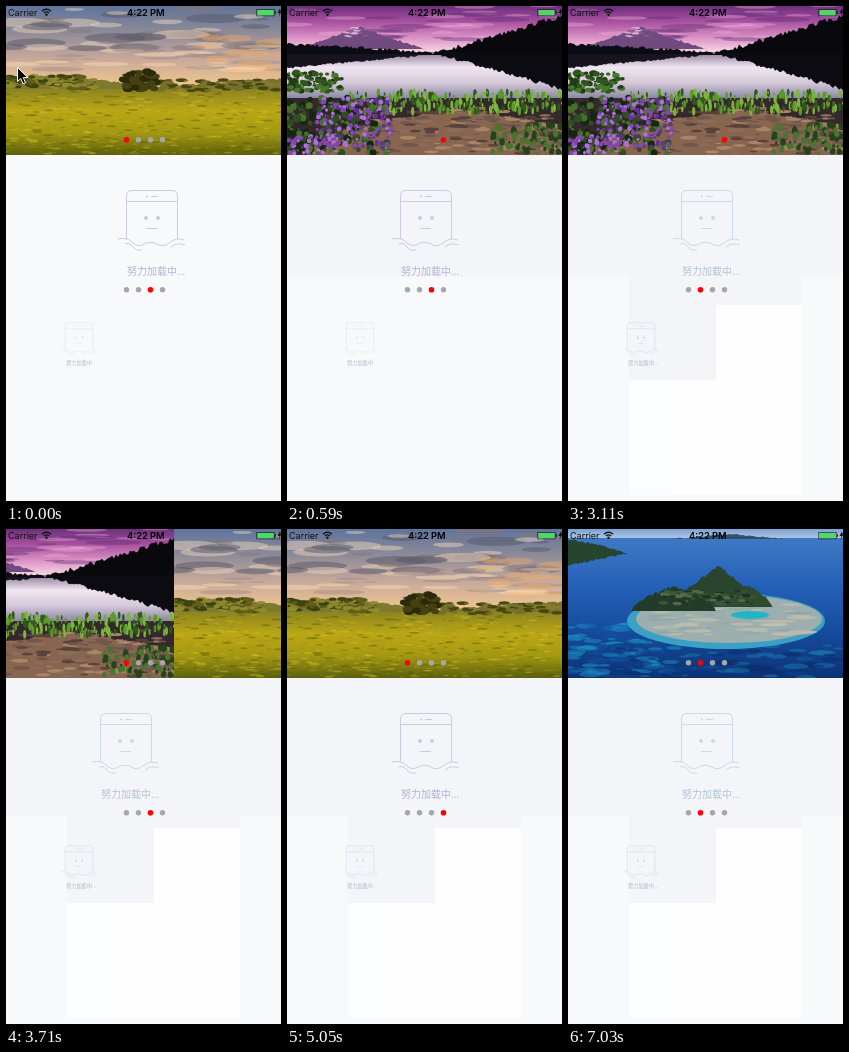
These frames come from a looping animation (275 by 495 pixels, 7.11 s). An HTML page with a canvas:

```html
<!DOCTYPE html>
<html lang="zh">
<head>
<meta charset="utf-8">
<title>Carousel</title>
<style>
html, body { margin: 0; width: 100%; height: 100%; overflow: hidden; background: #f7f9fb; }
canvas { display: block; width: 275px; height: 495px; }
</style>
</head>
<body>
<canvas id="stage" width="275" height="495"></canvas>
<script>
const W = 275, H = 495, PHOTO_H = 149, LOOP = 7110;
const STEP = 148.3; // ms between screen refreshes
const ctx = document.getElementById('stage').getContext('2d');
const TAU = Math.PI * 2;

// Moments when each pager starts to slide on by one page.
const TOP_SLIDES = [3580, 6580];
const LOW_SLIDES = [-272, 704, 1704, 2713, 3659, 4669, 5681, 6655];

let seed = 7;
const rnd = () => (seed = seed * 16807 % 2147483647) / 2147483647;
const mod4 = n => ((n % 4) + 4) % 4;

const progress = (t, start, length) => Math.min(1, Math.max(0, (t - start) / length));
function ease(t, start, length = 300) {
  const x = progress(t, start, length);
  return x * x * (3 - 2 * x);
}
const slide = (t, starts) => starts.reduce((sum, s) => sum + ease(t, s), 0);
const begun = (t, starts) => starts.filter(s => t >= s).length;

function rect(c, color, x, y, w, h) {
  c.fillStyle = color;
  c.fillRect(x, y, w, h);
}
function oval(c, color, x, y, rx, ry = rx) {
  c.fillStyle = color;
  c.beginPath();
  c.ellipse(x, y, rx, ry, 0, 0, TAU);
  c.fill();
}
function fade(c, y0, y1, ...colors) {
  const g = c.createLinearGradient(0, y0, 0, y1);
  colors.forEach((color, i) => g.addColorStop(i / (colors.length - 1), color));
  rect(c, g, 0, y0, W, y1 - y0);
}
// A rough slope rising from both ends to its peak; negative heights hang down.
function hill(c, color, peak, half, base, height, rough = 2, power = 1) {
  c.fillStyle = color;
  c.beginPath();
  c.moveTo(peak - half, base);
  for (let dx = -half; dx <= half; dx += 2) {
    const rise = (1 - Math.abs(dx) / half) ** power;
    c.lineTo(peak + dx, base - height * rise - (rnd() - .5) * rough);
  }
  c.lineTo(peak + half, base);
  c.fill();
}
function scatter(c, n, [x, y, w, h], rx, ry, ...colors) {
  for (let i = 0; i < n; i++) {
    const k = .3 + rnd() * .7;
    oval(c, colors[i % colors.length], x + rnd() * w, y + rnd() * h, rx * k, ry * k);
  }
}
function photo(paint) {
  const cv = document.createElement('canvas');
  cv.width = W;
  cv.height = PHOTO_H;
  paint(cv.getContext('2d'));
  return cv;
}

const valley = photo(c => {
  fade(c, 0, 80, '#5e749c', '#8f8b98', '#c9aa9a', '#efc58f');
  scatter(c, 40, [0, 0, W, 45], 32, 5, '#56586b80', '#e9d3bb80', '#86757a80');
  scatter(c, 30, [0, 40, W, 24], 28, 2.5, '#f6dcb580', '#9c878a70');
  scatter(c, 12, [195, 30, 80, 36], 30, 6, '#ffb25b50');
  hill(c, '#7d7a30', 40, 130, 88, 18, 2, .5);
  hill(c, '#85782f', 275, 150, 88, 15, 2, .5);
  fade(c, 83, PHOTO_H, '#8b8420', '#bba716', '#a39812', '#5a600d');
  scatter(c, 90, [0, 70, 90, 13], 6, 2.5, '#3f4212', '#615d1a', '#8f8b2c');
  scatter(c, 80, [150, 74, 125, 11], 6, 2, '#44470f', '#77702a');
  scatter(c, 60, [117, 66, 33, 17], 6, 4, '#2b2b0b', '#46420f');
  scatter(c, 500, [0, 86, W, 62], 5, 1, '#d8c02470', '#545a0a70', '#9c941870');
});

const island = photo(c => {
  fade(c, 0, 12, '#7ba2d4', '#bcd0e6');
  fade(c, 9, PHOTO_H, '#3f79c4', '#2561b8', '#154c9e', '#0c3274');
  hill(c, '#31506a', 160, 55, 10, 5);
  hill(c, '#25452f', 0, 58, 25, 15, 2, .7);
  hill(c, '#25452f', 0, 58, 24, -13, 2);
  scatter(c, 90, [0, 92, 110, 55], 12, 3, '#1d86bd90', '#169fc380', '#12509e90');
  scatter(c, 80, [50, 115, 225, 34], 14, 3, '#0b2c6a90', '#1a79b080', '#103f86a0');
  oval(c, '#3aa0c4', 158, 92, 99, 28);
  oval(c, '#9cafae', 161, 90, 93, 24);
  scatter(c, 60, [90, 74, 145, 32], 16, 2, '#cfc9b870', '#84a1a570', '#b9b9ac');
  oval(c, '#24b5c4', 182, 86, 19, 4);
  hill(c, '#29452d', 150, 55, 78, 41, 3);
  hill(c, '#223c2a', 106, 42, 82, 25, 3, .6);
  hill(c, '#304a30', 180, 24, 77, 20, 3, .6);
  scatter(c, 60, [95, 62, 90, 14], 5, 2, '#1b3423', '#3c5735', '#566a48');
});

const mountain = photo(c => {
  fade(c, 0, 48, '#6d2f7d', '#a8529f', '#dc93c6', '#fae0e8');
  scatter(c, 40, [0, 0, W, 34], 28, 2.5, '#eeb0da60', '#5c286f60');
  hill(c, '#714a80', 73, 66, 43, 22, 2, 1.1);
  scatter(c, 18, [60, 22, 26, 9], 5, 1.2, '#d9b0d0', '#8e6195');
  fade(c, 46, 92, '#8c7898', '#f0e6f0', '#d5c8d9', '#8a89a2');
  hill(c, '#0b0b12', 0, 160, 49, 11, 3, .7);
  hill(c, '#17131f', 0, 150, 48, -14, 2);
  hill(c, '#08080d', 275, 128, 48, 38, 5);
  hill(c, '#0d0b12', 275, 128, 47, -36, 4);
  rect(c, '#33282b', 0, 92, W, 57);
  hill(c, '#87654f', 175, 150, 149, 45, 3, .4);
  scatter(c, 170, [75, 100, 200, 48], 9, 2, '#a88468', '#57413a', '#8c6c5d', '#71564b');
  scatter(c, 100, [0, 66, 55, 20], 4, 3, '#1f3c14', '#48782a', '#315520');
  scatter(c, 260, [62, 86, 213, 20], 1.8, 5, '#5c9a2c', '#30591b', '#7fb53e');
  scatter(c, 100, [205, 118, 70, 30], 3, 4, '#26421d', '#4c7430');
  scatter(c, 200, [0, 92, 100, 57], 4, 4, '#16270f', '#2f4f20', '#46702c');
  scatter(c, 190, [30, 92, 75, 50], 2.5, 2.5, '#8546b4', '#ad72d6', '#652f98');
  scatter(c, 60, [0, 130, 55, 18], 2.5, 2.5, '#8546b4', '#ad72d6');
});

const photos = [valley, island, null, mountain];

function label(text, x, y, font, color) {
  ctx.font = font;
  ctx.fillStyle = color;
  ctx.fillText(text, x, y);
}
const hanFont = size => size + 'px "Noto Sans CJK SC", "Noto Sans CJK", sans-serif';

function dots(y, active, plain = true) {
  for (let i = 0; i < 4; i++) {
    if (i === active) oval(ctx, '#f00', 120.5 + i * 12, y, 2.8);
    else if (plain) oval(ctx, '#a9a6ab', 120.5 + i * 12, y, 2.7);
  }
}

// Placeholder phone rising from a cloud; origin is its top left corner.
function phone(x, y, scale, color) {
  ctx.save();
  ctx.translate(x, y);
  ctx.scale(scale, scale);
  ctx.strokeStyle = color;
  ctx.stroke(new Path2D('M.5 49V6Q.5 .5 6 .5H46Q51.5 .5 51.5 6V49M.5 11.5H51.5M25 6.5H32M20 38.5H31'));
  ctx.stroke(new Path2D('M-8 49Q1 47 6 52Q11 57 16 55Q24 50 31 54Q37 58 43 53Q50 47 58 50' +
    'M-1 54Q3 52 7 57Q10 61 16 60M45 57Q51 52 59 55'));
  oval(ctx, color, 21, 6.5, 1.1);
  oval(ctx, color, 20, 28, 2);
  oval(ctx, color, 32, 28, 2);
  ctx.restore();
}

function cursor(x, y) {
  ctx.save();
  ctx.translate(x, y);
  const arrow = new Path2D('M.5 .5V14.5L3.8 11.5L6 16.8L8.5 15.7L6.3 10.6H10.8Z');
  ctx.fillStyle = '#000';
  ctx.strokeStyle = '#fff';
  ctx.lineWidth = 1;
  ctx.fill(arrow);
  ctx.stroke(arrow);
  ctx.restore();
}

function statusBar() {
  label('Carrier', 2, 10, '9px Inter, sans-serif', '#111');
  label('4:22 PM', 121, 10, '600 9.3px Inter, sans-serif', '#000');
  ctx.strokeStyle = '#111';
  ctx.lineWidth = 1.4;
  for (const r of [3.4, 6]) {
    ctx.beginPath();
    ctx.arc(40.5, 9.3, r, -Math.PI * .77, -Math.PI * .23);
    ctx.stroke();
  }
  oval(ctx, '#111', 40.5, 8.8, 1.2);
  ctx.lineWidth = .6;
  ctx.strokeRect(250.8, 3.3, 17.4, 6.6);
  rect(ctx, '#4cd964', 251.5, 4, 16, 5.2);
  rect(ctx, '#111', 268.8, 5.3, 1, 2.6);
  ctx.fill(new Path2D('M274 2.5L271.5 7H273.5L272.5 11L275 6Z'));
  ctx.lineWidth = 1;
}

function backdrop(t) {
  const gray = '#f3f5f9';
  rect(ctx, '#f7f9fb', 0, 0, W, H);
  if (t > 0) rect(ctx, gray, 0, PHOTO_H, W, (t < 3700 ? 271 : 287) - PHOTO_H);
  if (t > 1700) {
    rect(ctx, '#fefefe', 61, 299, 173, 190);
    rect(ctx, '#fcfdfe', 61, 374, 43, 115);
    rect(ctx, gray, 61, 271, 173, 28);
    rect(ctx, gray, 61, 299, 87, 75);
  }
}

function topPager(t, drag) {
  const pos = slide(t, TOP_SLIDES) - drag;
  const page = Math.floor(pos);
  const shift = Math.round((pos - page) * W);
  for (const i of [0, 1]) {
    const x = i * W - shift;
    if (x < W) ctx.drawImage(photos[mod4(page + i)], x, 0);
  }
  const active = mod4(begun(t, TOP_SLIDES) - Math.round(drag));
  dots(133.7, active, active !== 3);
}

function lowPager(t) {
  const hues = [218, 208, 246, 240];
  const pos = 1 + slide(t, LOW_SLIDES);
  const page = Math.floor(pos);
  for (const i of [0, 1]) {
    const x = Math.round((page + i - pos) * W);
    const hue = hues[mod4(page + i)];
    phone(113 + x, 184, 1, `hsl(${hue} 38% 85%)`);
    label('努力加载中...', 114 + x, 269, hanFont(10), `hsl(${hue} 28% 76%)`);
  }
  dots(283.7, mod4(1 + begun(t, LOW_SLIDES)));
}

function thumb(t) {
  const early = t < 1700;
  phone(59, 316.5, .54, early ? '#e2e3ef' : '#ced6e8');
  label(early ? '努力加载中' : '努力加载中...', 60, 359, hanFont(5.2), '#b3b5cf');
}

// The pointer drags the photo out to the right, then returns and leaves downwards.
function pointer(t, drag) {
  if (drag < 1) cursor(11 + W * drag, 61);
  else if (t > 1100 && t < 2000) {
    const a = ease(t, 1170, 150), b = ease(t, 1470, 250);
    cursor(71 + 40 * a + 39 * b, 61 + 114 * a + 296 * b);
  }
}

function draw(now) {
  const t = Math.floor((now % LOOP + 20) / STEP) * STEP;
  const drag = 1 - (1 - progress(t, 100, 483)) ** 2;
  backdrop(t);
  topPager(t, drag);
  lowPager(t);
  thumb(t);
  statusBar();
  pointer(t, drag);
}

let start;
function loop(now) {
  start ??= now;
  draw(Math.max(0, now - start));
  requestAnimationFrame(loop);
}
draw(0);
requestAnimationFrame(loop);
</script>
</body>
</html>
```
